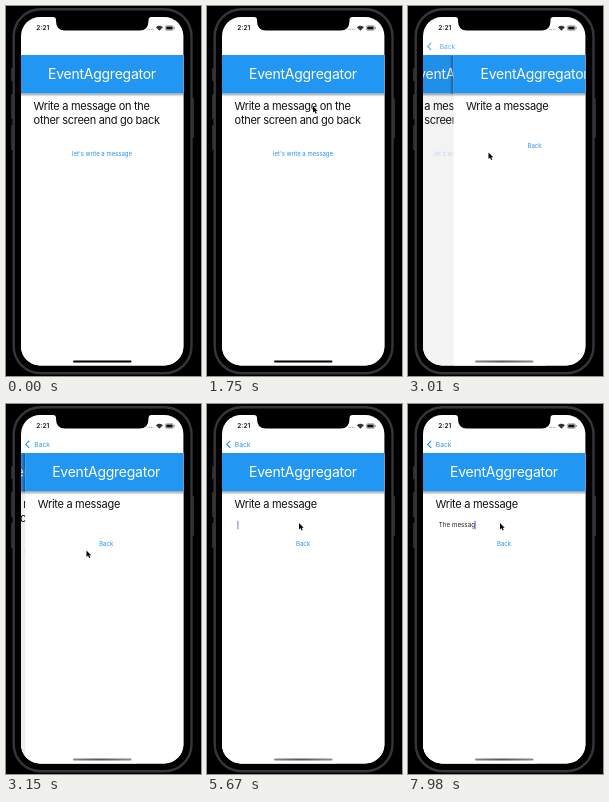
These frames come from a looping animation (195x370 px, 8 s). An HTML page:

```html
<!DOCTYPE html>
<html lang="en">
<head>
<meta charset="utf-8">
<title>Event aggregator demo</title>
<style>
  html, body { margin: 0; width: 100%; height: 100%; overflow: hidden; background: #000; }
  svg { display: block; width: 100%; height: 100%; }
  text { font-family: Inter, Roboto, sans-serif; white-space: pre; }
  .title { font-size: 14px; letter-spacing: -.25px; fill: #fff; }
  .body { font-size: 11px; letter-spacing: -.29px; fill: #111; }
  .link { font-size: 6px; fill: #2492f0; }
  .nav { font-size: 6.7px; fill: #2492f0; }
  .field { font-size: 6.25px; fill: #222; }
  .clock { font-size: 6.5px; font-weight: 600; fill: #111; }
</style>
</head>
<body>
<svg viewBox="0 0 195 370">
  <defs>
    <clipPath id="screen"><rect x="15" y="11" width="162.4" height="348.4" rx="19"/></clipPath>
    <linearGradient id="drop" x2="0" y2="1">
      <stop stop-color="#000" stop-opacity=".38"/><stop offset="1" stop-color="#000" stop-opacity="0"/>
    </linearGradient>
    <linearGradient id="edge">
      <stop stop-color="#000" stop-opacity="0"/><stop offset="1" stop-color="#000" stop-opacity=".38"/>
    </linearGradient>
    <linearGradient id="homeGrey">
      <stop stop-color="#888"/><stop offset=".45" stop-color="#555"/><stop offset="1" stop-color="#8c8c8c"/>
    </linearGradient>
    <g id="header">
      <rect x="15" y="49" width="163" height="311" fill="#fff"/>
      <rect x="11.5" y="50" width="3.5" height="38" fill="url(#edge)"/>
      <rect x="15" y="87.3" width="163" height="3.5" fill="url(#drop)"/>
      <rect x="15" y="49" width="163" height="38.3" fill="#2196f3"/>
      <text class="title" x="42" y="73.3">EventAggregator</text>
    </g>
  </defs>

  <!-- phone body -->
  <rect width="195" height="370"/>
  <g fill="#2c2c2e">
    <rect x="5" y="62" width="2" height="13" rx=".6"/>
    <rect x="5" y="88" width="2" height="25" rx=".6"/>
    <rect x="5" y="119" width="2" height="25" rx=".6"/>
    <rect x="186" y="92" width="2" height="40" rx=".6"/>
  </g>
  <rect x="7.7" y="3.2" width="177.8" height="364" rx="27" stroke="#363638" stroke-width="2.4"/>

  <g clip-path="url(#screen)">
    <rect x="15" y="11" width="163" height="349" fill="#fff"/>

    <g id="first">
      <use href="#header"/>
      <text class="body" x="27.6" y="104.2">Write a message on the</text>
      <text class="body" x="27.6" y="118.2">other screen and go back</text>
      <text class="link" id="open" x="66" y="150">let's write a message</text>
    </g>
    <rect id="dim" x="15" y="49" width="163" height="311"/>

    <g id="second">
      <use href="#header"/>
      <text class="body" x="27.6" y="104.2">Write a message</text>
      <text class="field" id="field" x="30.8" y="123.2"></text>
      <rect id="caret" y="116.8" width="1" height="8.6" fill="#4a63e6"/>
      <text class="link" x="89" y="142">Back</text>
    </g>

    <g id="navBar">
      <path d="M23.2 36.9L19.7 40.4L23.2 43.9" fill="none" stroke="#2492f0" stroke-width="1.2"/>
      <text class="nav" id="navBack" y="42.8">Back</text>
    </g>

    <!-- status bar -->
    <text class="clock" x="30.3" y="24.4">2:21</text>
    <path d="M141.5 23.3h6" stroke="#999" stroke-dasharray="1 .7"/>
    <path d="M153.4 24.8L149.9 21.2Q153.4 18.3 156.9 21.2Z" fill="#333"/>
    <rect x="159.4" y="19.7" width="8" height="4.6" rx="1.2" fill="none" stroke="#777" stroke-width=".6"/>
    <rect x="160.2" y="20.4" width="6.4" height="3.2" rx=".6" fill="#111"/>
    <rect x="168" y="21.2" width=".8" height="1.6" fill="#777"/>

    <!-- notch -->
    <path d="M47 10V11Q50 11 50 14V15Q50 24.5 59 24.5H133.5Q142.5 24.5 142.5 15V14Q142.5 11 145.5 11V10Z"/>
    <rect id="home" x="67" y="354.6" width="58.5" height="2" rx="1"/>
  </g>

  <path id="pointer" d="M0 0V6.4L1.5 5.1L2.6 7.5L3.7 7L2.7 4.7H4.7Z" stroke="#fff" stroke-width=".5" paint-order="stroke"/>
</svg>

<script>
const LOOP = 8000, TICK = 70;
const WIDTH = 163, PARALLAX = 0.3;
const ENTER = 910, PRESS = 2660, PUSH = 2832, FOCUS = 3990;
const MESSAGE = 'The messag';

// Key points: time in ms, then values
const pointerPath = [
  [ENTER, 106, 191], [1120, 99, 181], [1440, 60, 104], [1710, 110, 92],
  [1890, 92, 129], [2520, 80.5, 146.5], [3220, 80.5, 146.5], [3570, 92, 119]
];
const typing = [[6020, 0], [6090, 1], [6440, 2], [6860, 6], [7210, 7], [7980, 10]];

const $ = id => document.getElementById(id);
const set = (id, name, value) => $(id).setAttribute(name, value);
const shift = (id, x, y = 0) => set(id, 'transform', `translate(${x} ${y})`);
const clamp = v => Math.min(1, Math.max(0, v));

function between(points, t) {
  const next = points.findIndex(point => point[0] > t);
  if (next < 1) return points.at(next).slice(1);
  const a = points[next - 1], b = points[next];
  const k = (t - a[0]) / (b[0] - a[0]);
  return a.slice(1).map((v, i) => v + (b[i + 1] - v) * k);
}

// Critically damped spring from 0 to 1
function spring(ms) {
  const s = Math.max(0, ms) * 0.0175;
  return 1 - (1 + s) * Math.exp(-s);
}

// Caret is dark for a short, softly faded part of each period
function blink(ms) {
  const phase = (ms + 420) % 1050;
  return clamp((Math.abs(phase - 225) - 90) / 160);
}

function draw(time) {
  const t = Math.floor(time / TICK) * TICK;

  shift('pointer', ...between(pointerPath, t));
  set('pointer', 'opacity', t < ENTER ? 0 : 1);

  const p = spring(t - PUSH);
  shift('first', -PARALLAX * WIDTH * p);
  shift('second', (WIDTH + 4) * (1 - p));
  set('dim', 'opacity', .07 * p * p);
  set('open', 'opacity', t < PRESS ? 1 : .25);
  set('navBar', 'opacity', Math.sqrt(p) * p);
  set('navBack', 'x', 27.8 + 21 * (1 - p));
  set('home', 'fill', t < PUSH ? '#000' : 'url(#homeGrey)');

  const typed = Math.floor(between(typing, t)[0] + 1e-6);
  $('field').textContent = MESSAGE.slice(0, typed);
  set('caret', 'x', 30.4 + (typed && $('field').getComputedTextLength()));
  set('caret', 'opacity', t < FOCUS ? 0 : typed ? 1 : blink(t - FOCUS));
}

const start = performance.now();
function frame() {
  draw((performance.now() - start) % LOOP);
  requestAnimationFrame(frame);
}
frame();
</script>
</body>
</html>
```
